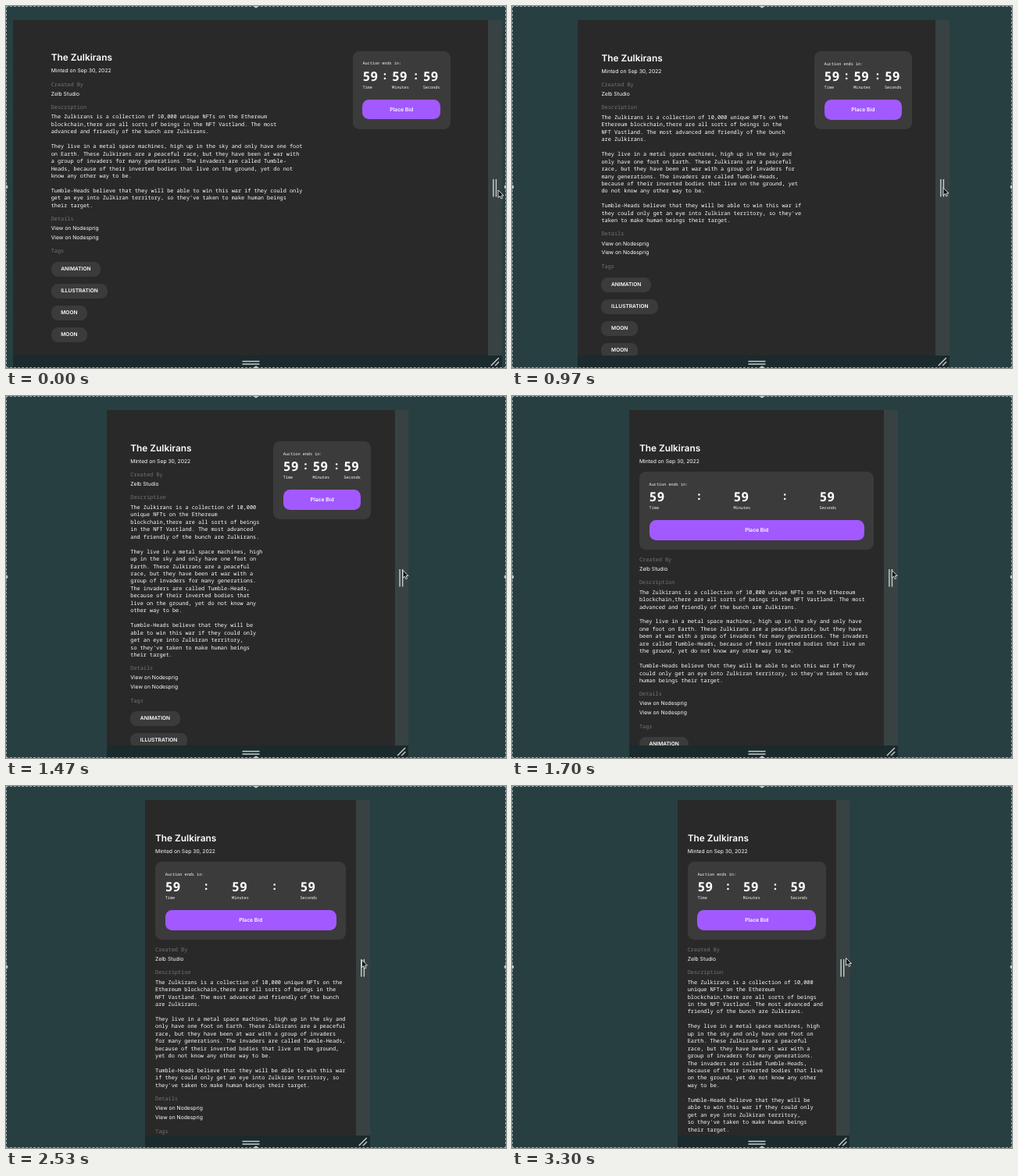
An HTML page that plays this animation: 640x464 px, repeating every 3.6 s.

```html
<!DOCTYPE html>
<html lang="en">
<head>
<meta charset="utf-8">
<title>Responsive preview</title>
<style>
  html, body { margin: 0; width: 100%; height: 100%; overflow: hidden; }
  body {
    position: relative; background: #283f42; color: #fff;
    font: 6.78px/11px Inter, "Open Sans", sans-serif;
    text-rendering: geometricPrecision;
  }
  p, h1 { margin: 0; }
  #stage { position: absolute; left: 0; top: 0; width: 640px; height: 464px; overflow: hidden; }
  #page { position: absolute; top: 18px; height: 430px; overflow: hidden; background: #292929; }
  #side { position: absolute; top: 18px; height: 430px; width: 17.2px; background: #384242; }
  #foot { position: absolute; top: 448px; height: 16px; background: #1b2a2c; }
  #frame { position: absolute; inset: 0; border: 1px dashed #9eabab; }
  svg { position: absolute; left: 0; top: 0; }

  #wrap { position: relative; padding: 41.5px var(--pad) 0; }
  h1 { font-size: 11.87px; line-height: 14px; font-weight: 600; white-space: nowrap; }
  .minted { margin-top: 4px; line-height: 12px; white-space: nowrap; }
  .mono, .label { font-family: "Noto Sans Mono", "Liberation Mono", monospace; font-size: 6.89px; }
  .label { color: #757575; margin-top: 6.8px; }
  .text { margin-top: 2.8px; line-height: 9.46px; }
  .text p { text-wrap: pretty; }
  .text p + p { margin-top: 9.46px; }
  .text + .label { margin-top: 6.5px; }
  .links { line-height: 11.4px; margin: .5px 0 7.4px; }
  .tag {
    width: fit-content; height: 19px; line-height: 19px; padding: 0 12.6px;
    margin-bottom: 9px; border-radius: 8.5px; background: #3b3b3b;
    font-size: 6.6px; font-weight: 600;
  }
  .tags { margin-top: 7.8px; }

  #card {
    box-sizing: border-box; height: 100px; margin: 7.5px 0 8px; padding: 12.7px;
    position: relative; border-radius: 8.5px; background: #3b3b3b;
  }
  .small { font-size: 5.18px; line-height: 6px; }
  .clock { display: flex; gap: 4.23px; margin-top: 4.8px; font-weight: 700; }
  .clock > * { flex: 1 1 auto; }
  .clock b { display: block; font-size: 16.4px; line-height: 18px; }
  .clock i { font-style: normal; font-size: 14px; line-height: 18px; }
  .clock .small { font-weight: 400; margin-top: 1.7px; }
  .bid {
    position: absolute; left: 12.7px; right: 12.7px; top: 62.2px; height: 25.4px;
    border-radius: 8.5px; background: #a259ff; line-height: 25px;
    text-align: center; font-weight: 600;
  }
  .wide #card { position: absolute; top: 40px; right: var(--pad); width: 125px; margin: 0; }
  .full #wrap { top: -.5px; }
</style>
</head>
<body>
<div id="stage">
  <div id="foot"></div>
  <div id="page">
    <div id="wrap">
      <h1>The Zulkirans</h1>
      <p class="minted">Minted on Sep 30, 2022</p>
      <div id="card">
        <p class="mono small">Auction ends in:</p>
        <div class="mono clock">
          <div><b>59</b><p class="small">Time</p></div>
          <i>:</i>
          <div><b>59</b><p class="small">Minutes</p></div>
          <i>:</i>
          <div><b>59</b><p class="small">Seconds</p></div>
        </div>
        <div class="bid">Place Bid</div>
      </div>
      <p class="label">Created By</p>
      <p>Zelb Studio</p>
      <p class="label">Description</p>
      <div class="mono text" id="text">
        <p>The Zulkirans is a collection of 10,000 unique NFTs on the Ethereum blockchain,there are all sorts of beings in the NFT Vastland. The most advanced and friendly of the bunch are Zulkirans.</p>
        <p>They live in a metal space machines, high up in the sky and only have one foot on Earth. These Zulkirans are a peaceful race, but they have been at war with a group of invaders for many generations. The invaders are called Tumble-Heads, because of their inverted bodies that live on the ground, yet do not know any other way to be.</p>
        <p>Tumble-Heads believe that they will be able to win this war if they could only get an eye into Zulkiran territory, so they've taken to make human beings their target.</p>
      </div>
      <p class="label">Details</p>
      <div class="links"><p>View on Nodesprig</p><p>View on Nodesprig</p></div>
      <p class="label">Tags</p>
      <div class="tags">
        <div class="tag">ANIMATION</div>
        <div class="tag">ILLUSTRATION</div>
        <div class="tag">MOON</div>
        <div class="tag">MOON</div>
      </div>
    </div>
  </div>
  <div id="side"></div>
  <div id="frame"></div>
  <svg width="640" height="464" fill="none" stroke="#c9cdcd" stroke-width="1.4">
    <g fill="#c3caca" stroke="none">
      <circle cx="320" cy="0" r="2.4"/><circle cx="320" cy="464" r="2.4"/>
      <circle cx="0" cy="232" r="2.4"/><circle cx="640" cy="232" r="2.4"/>
    </g>
    <path d="M302.5 455.5h22M302.5 459h22"/>
    <path id="grip" d="M6.4 222v22.5M10 222v22.5M3.4 461l10-10M8.6 461l5-5"/>
    <path id="cursor" d="M0 0V9.6L2.3 7.6L3.8 11L5.5 10.2L4 7H7Z" fill="#111" stroke="#fff" stroke-width=".8"/>
  </svg>
</div>
<script>
  const LOOP = 3600, MID = 313.2, MAX = 511, STACK = 353;
  const CARD = 138, MEASURE = 324, CHAR = 4.13;
  // time, page left edge, pointer x, pointer y
  const keys = [
    [0, 9, 630, 236], [167, 9, 630, 236], [533, 59, 578.5, 236],
    [700, 68, 568, 235], [967, 84, 552, 233], [1233, 105, 530, 229],
    [1467, 128.8, 508, 223.5], [1767, 156, 480, 223.5], [1967, 166, 469.5, 223.5],
    [2167, 177, 456.5, 223], [2500, 177, 456.5, 223], [2533, 178, 455.5, 223],
    [2767, 207, 430, 221], [2933, 207, 430, 221], [3300, 211.7, 427.5, 220.5],
    [LOOP, 211.7, 427.5, 220.5]
  ];
  const el = id => document.getElementById(id);
  const page = el('page'), text = el('text'), side = el('side'), foot = el('foot');
  const grip = el('grip'), cursor = el('cursor');
  const px = n => n.toFixed(2) + 'px';

  function pose(t) {
    let i = 1;
    while (i < keys.length - 1 && t > keys[i][0]) i++;
    const a = keys[i - 1], b = keys[i];
    const k = Math.min(1, (t - a[0]) / (b[0] - a[0]));
    return a.map((v, n) => v + (b[n] - v) * k);
  }

  function draw(now) {
    const t = Math.floor((now % LOOP + 3.4) * .03) / .03;
    const [, left, cx, cy] = pose(Math.min(t, LOOP));
    const width = 2 * (MID - left), right = left + width;
    const wide = width >= STACK;
    const pad = Math.max(wide ? 30.5 : 13, (width - MAX) / 2);
    const column = Math.min(MEASURE, width - 2 * pad - (wide ? CARD : 0));

    page.style.left = foot.style.left = px(left);
    page.style.width = px(width);
    foot.style.width = px(width + 17.2);
    side.style.left = px(right);
    page.style.setProperty('--pad', px(pad));
    // whole characters per line, with a little slack for rounding
    text.style.width = Math.floor(column / CHAR) + .2 + 'ch';
    page.classList.toggle('wide', wide);
    page.classList.toggle('full', width > MAX + 61);
    grip.setAttribute('transform', `translate(${right} 0)`);
    cursor.setAttribute('transform', `translate(${cx} ${cy})`);
  }

  function tick() {
    draw(performance.now());
    requestAnimationFrame(tick);
  }
  tick();
</script>
</body>
</html>
```
